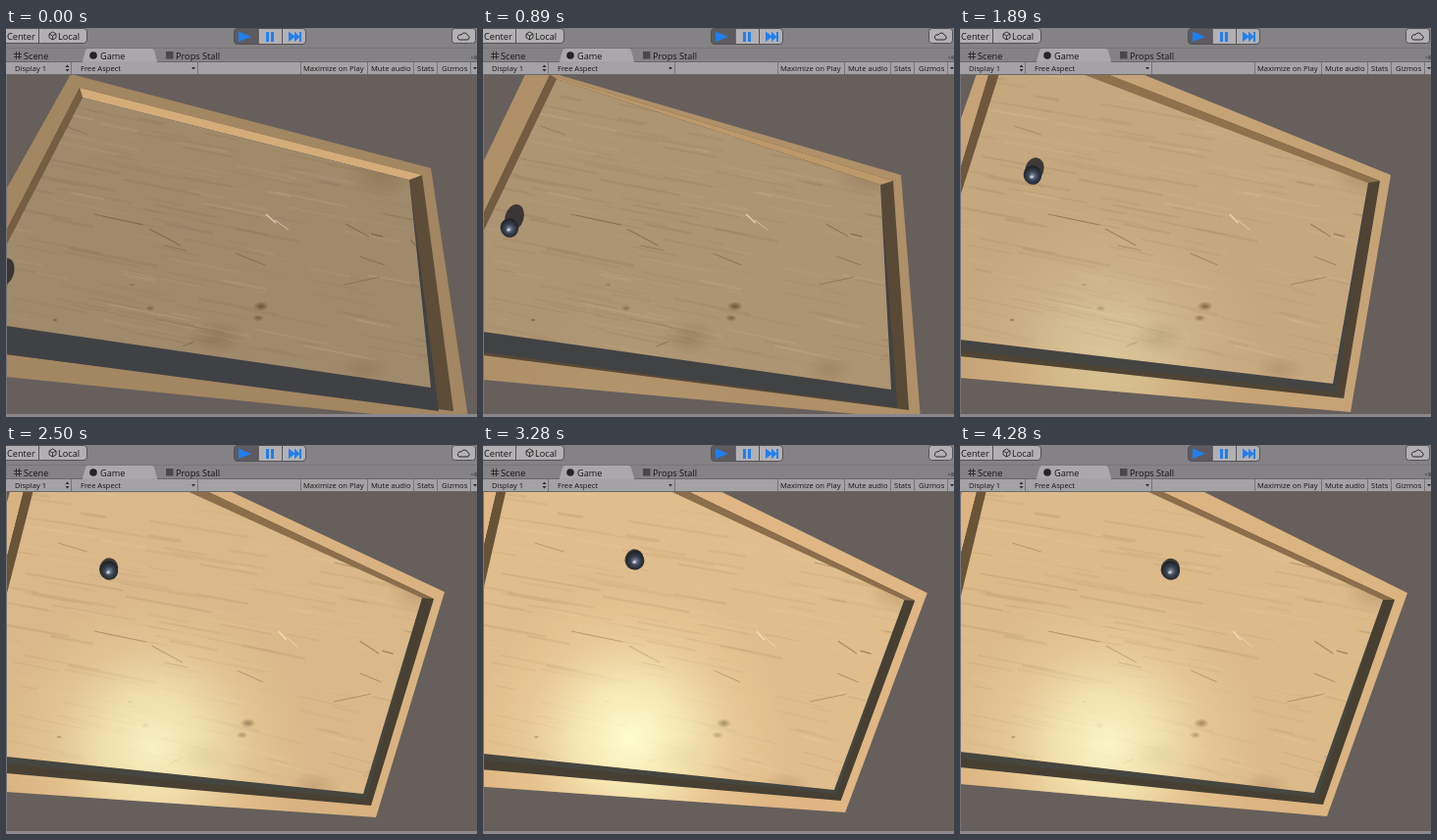
Write an HTML page with a canvas that moves like this. It is 480 px wide and 397 px high and loops after 4340 ms.

```html
<!DOCTYPE html>
<html lang="en">
<head>
<meta charset="utf-8">
<title>Ball on a tilting tray</title>
<style>
  html, body { margin: 0; width: 100%; height: 100%; overflow: hidden; background: #665f5b; }
  canvas, svg { position: absolute; left: 0; top: 0; }
  text { font: 9.2px "Open Sans", "Noto Sans", sans-serif; fill: #141414; }
  .small { font-size: 7.6px; }
</style>
</head>
<body>
<canvas id="view" width="480" height="397"></canvas>
<svg width="480" height="397">
  <rect width="480" height="47" fill="#858286"/>
  <path d="M0 20.5H480" stroke="#787579"/>
  <path d="M78 34L81 23Q82 21 84 21H148Q150 21 151 23L154 34Z" fill="#aba8ab"/>
  <rect y="34" width="480" height="13" fill="#a5a2a5"/>
  <path d="M0 34.5H78M154 34.5H480M0 47.5H480" stroke="#6b686b"/>
  <path d="M.5 47V397" stroke="#777377"/>
  <rect y="394" width="480" height="3" fill="#8b878a"/>

  <g fill="#b3b0b3" stroke="#555256">
    <path d="M-1 .5H33.5V15.5H-1ZM33.500 .5H79Q82.500 .5 82.500 4V12Q82.500 15.500 79 15.500H33.500Z"/>
    <path d="M257 .5H302Q305.500 .5 305.500 4V13Q305.500 16.500 302 16.500H257ZM281.500 .5V16.500"/>
    <path d="M257 .5H236Q232.500 .5 232.500 4V13Q232.500 16.500 236 16.500H257Z" fill="#5d5b61"/>
    <rect x="454.500" y=".5" width="24" height="15" rx="3"/>
  </g>
  <path d="M237 3.500L250 9L237 14ZM265 4H268V14H265ZM270 4H273V14H270ZM288 3.500L294 8V3.500L299 8.500V4H301V14H299V9.500L294 14V9.500L288 14Z" fill="#1f7ff0"/>
  <g fill="none" stroke="#2b2b2b">
    <path d="M462 12H470A2.300 2.300 0 0 0 470.500 7.500A3.500 3.500 0 0 0 464 7A2.500 2.500 0 0 0 462 12Z"/>
    <path d="M44 6L47.500 4L51 6V10L47.500 12L44 10ZM44 6L47.500 8L51 6M47.500 8V12" stroke-width=".9"/>
    <path d="M10.500 24V32M13.500 24V32M8 26.500H16M8 29.500H16" stroke-width=".9"/>
    <path d="M66.500 35V47M195.500 35V47M300.500 35V47M368.500 35V47M415.500 35V47M439.500 35V47M473.500 35V47" stroke="#777477"/>
    <path d="M474 30H476M477 29H480M477 31H480" stroke-width=".8"/>
  </g>
  <circle cx="89" cy="28" r="3.800" fill="#242424"/>
  <rect x="163" y="24" width="7.500" height="7.500" fill="#4a484b"/>
  <path d="M60.500 40L62.500 37.500L64.500 40ZM60.500 42L62.500 44.500L64.500 42ZM189 40H193L191 42.500ZM476 40H480L478 42.500Z" fill="#2b2b2b"/>

  <text x="1" y="12">Center</text>
  <text x="53" y="12">Local</text>
  <text x="18" y="32">Scene</text>
  <text x="96" y="32">Game</text>
  <text x="173" y="32">Props Stall</text>
  <g class="small">
    <text class="small" x="9" y="44">Display 1</text>
    <text class="small" x="76" y="44">Free Aspect</text>
    <text class="small" x="303" y="44">Maximize on Play</text>
    <text class="small" x="372" y="44">Mute audio</text>
    <text class="small" x="419" y="44">Stats</text>
    <text class="small" x="444" y="44">Gizmos</text>
  </g>
</svg>
<script>
const ctx = document.getElementById('view').getContext('2d');
const LOOP = 4340, FPS = 18;
const times = [0, 890, 1890, 2500, 2890, 3670, 4280];

// Each row: top left x y, top right x y, bottom right x y,
// then the heights where the lower and left edges cross x = 0.
const outerKeys = [
  [66, 47, 433, 143, 472, 404, 356, 165],
  [47, 39, 426, 150, 446, 400, 359, 137],
  [38, -13, 439, 150, 398, 392, 357, 95],
  [30, -46, 447, 150, 377, 380, 354, 62],
  [28, -55, 450, 151, 371, 376, 351, 50],
  [28, -60, 455, 151, 369, 375, 347, 50],
  [30, -61, 456, 151, 374, 379, 346, 55]
];
const innerKeys = [
  [75, 61, 424, 150, 456, 391, 333, 207],
  [68, 48, 418, 156, 434, 390, 334, 190],
  [42, 5, 428, 156, 391, 378, 335, 145],
  [38, -32, 436, 157, 372, 368, 335, 118],
  [34, -37, 438, 158, 366, 364, 333, 108],
  [34, -36, 442, 159, 365, 363, 330, 108],
  [37, -31, 443, 158, 370, 367, 329, 115]
];
const floorKeys = [
  [78, 71, 411, 155, 433, 367, 304, 222],
  [75, 52, 405, 160, 416, 369, 310, 208],
  [49, 18, 416, 158, 380, 363, 318, 172],
  [44, -17, 424, 156, 364, 356, 318, 155],
  [40, -23, 427, 157, 359, 353, 316, 150],
  [40, -23, 431, 159, 358, 352, 314, 150],
  [43, -21, 431, 158, 361, 355, 313, 158]
];
// Ball x, y and brightness of the light.
const ballKeys = [
  [-8, 262, 0], [27, 204, .2], [74, 150, .6], [105, 128, .92],
  [131, 120, 1], [179, 118, 1], [215, 128, .95]
];
// Scratches: x, y, dx, dy, width.
const scratches = [
  [90, 190, 50, 11, 1], [146, 205, 32, 17, 1.2], [160, 222, 24, 5, .8],
  [234, 230, 30, 12, 1], [346, 200, 24, 13, 1.1], [360, 233, 26, 9, .9],
  [345, 262, 36, -8, .8], [412, 216, 8, 9, 1.2], [372, 210, 12, 3, 1.4],
  [60, 100, 24, 9, .7], [296, 120, 20, 5, .8], [180, 325, 12, -5, 1]
];
// Spots: x, y, radius, opacity.
const spots = [
  [260, 284, 8, .75], [257, 296, 6, .6], [147, 286, 5, .5], [50, 298, 3, .7],
  [128, 262, 3, .4], [215, 316, 30, .22], [385, 150, 38, .2], [365, 348, 26, .15]
];

let seed = 11;
const random = () => (seed = seed * 16807 % 2147483647) / 2147483647;
const grain = Array.from({length: 280}, () => ({
  x: random() * 480 - 40, y: random() * 370 + 10, length: 15 + random() * 75,
  width: .6 + random() * 2.4, dark: random() < .6, alpha: .03 + random() * .07
}));

// Smooth curve through the keys, with unequal time steps.
function sample(keys, t) {
  const last = times.length - 1;
  let i = 0;
  while (i < last - 1 && t >= times[i + 1]) i++;
  const span = times[i + 1] - times[i], u = (t - times[i]) / span;
  return keys[i].map((_, c) => {
    const slope = k => {
      const a = Math.max(k - 1, 0), b = Math.min(k + 1, last);
      return (keys[b][c] - keys[a][c]) / (times[b] - times[a]) * span;
    };
    const p = keys[i][c], q = keys[i + 1][c], m = slope(i), n = slope(i + 1);
    return p + u * (m + u * (3 * (q - p) - 2 * m - n + u * (2 * (p - q) + m + n)));
  });
}

const lerp = (a, b, k) => a + (b - a) * k;
const mix = (a, b, k) => `rgb(${a.map((v, i) => Math.round(lerp(v, b[i], k)))})`;

function polygon(...coords) {
  const path = new Path2D();
  for (let i = 0; i < coords.length; i += 2) path.lineTo(coords[i], coords[i + 1]);
  path.closePath();
  return path;
}
const board = q => polygon(...q.slice(0, 6), 0, q[6], 0, q[7]);

function fill(path, style) {
  ctx.fillStyle = style;
  ctx.fill(path);
}

function radial(x, y, r, ...stops) {
  const g = ctx.createRadialGradient(x, y, 0, x, y, r);
  stops.forEach((s, i) => g.addColorStop(i / (stops.length - 1), s));
  return g;
}

function disc(x, y, rx, ry, angle, style) {
  ctx.beginPath();
  ctx.ellipse(x, y, rx, ry, angle, 0, 7);
  ctx.fillStyle = style;
  ctx.fill();
}

function drawWood(cornerX) {
  const shear = (cornerX - 433) * .004;
  const place = (x, y) => [x + shear * (y - 235) * (x - 90) / 170, y];
  const line = (x, y, dx, dy, width, color) => {
    ctx.beginPath();
    ctx.moveTo(...place(x, y));
    ctx.lineTo(...place(x + dx, y + dy));
    ctx.lineWidth = width;
    ctx.strokeStyle = color;
    ctx.stroke();
  };
  for (const g of grain)
    line(g.x, g.y, g.length, g.length * .2, g.width,
      `rgba(${g.dark ? '85,55,25' : '255,235,200'},${g.alpha})`);
  for (const [x, y, r, alpha] of spots) {
    const [px, py] = place(x, y);
    ctx.save();
    ctx.translate(px, py);
    ctx.scale(1, .6);
    disc(0, 0, r, r, 0, radial(0, 0, r, `rgba(92,60,32,${alpha})`, 'rgba(92,60,32,0)'));
    ctx.restore();
  }
  for (const [x, y, dx, dy, width] of scratches) line(x, y, dx, dy, width, 'rgba(95,65,38,.42)');
  line(265, 190, 10, 9, 1.6, 'rgba(255,240,215,.6)');
  line(274, 196, 14, 10, 1, 'rgba(255,240,215,.5)');
}

function drawBall(x, y, light) {
  const dark = 1 - light;
  disc(x + dark * 7.5 - 1, y - dark * 12 - 1, 9.5, 10.5 + dark * 4, .3, 'rgba(38,38,42,.85)');
  disc(x, y, 9.2, 9.8, -.3, radial(x, y + 1, 10, '#9aa3ae', '#5b687b', '#38414f', '#2b313b', '#1d2128'));
  disc(x - 1, y + 2, 1.8, 1.5, 0, 'rgba(225,230,235,.75)');
}

function draw(t) {
  const outer = sample(outerKeys, t), inner = sample(innerKeys, t), floor = sample(floorKeys, t);
  const [x, y, light] = sample(ballKeys, t);
  const glowPower = light * light * .95;
  const glow = radial(150, 400 - 100 * light, 160,
    `rgba(255,255,208,${glowPower})`, `rgba(255,250,198,${glowPower * .72})`,
    `rgba(255,235,180,${glowPower * .25})`, 'rgba(255,230,170,0)');

  fill(polygon(0, 0, 480, 0, 480, 397, 0, 397), '#665f5b');

  const rim = board(outer);
  fill(rim, mix([163, 134, 98], [222, 182, 132], light));
  fill(rim, glow);

  // Lower and right walls, then the shaded part of the floor.
  fill(board(inner), mix([92, 76, 56], [70, 63, 50], light));
  const depth = 1 - .6 * light;
  fill(polygon(...floor.slice(0, 4),
    lerp(floor[4], inner[4], .35), lerp(floor[5], inner[5], depth),
    0, lerp(floor[6], inner[6], depth), 0, floor[7]), mix([64, 65, 68], [70, 70, 64], light));

  fill(polygon(...inner.slice(0, 4), floor[2], floor[3], floor[0], floor[1]),
    mix([212, 172, 122], [140, 110, 76], Math.min(1, light * 1.6)));
  fill(polygon(inner[0], inner[1], floor[0], floor[1], 0, floor[7], 0, inner[7]),
    mix([118, 94, 66], [104, 83, 55], light));

  const base = board(floor);
  fill(base, mix([160, 138, 108], [223, 188, 140], light));
  ctx.save();
  ctx.clip(base);
  drawWood(floor[4]);
  fill(base, glow);
  ctx.restore();

  drawBall(x, y, light);
}

const start = performance.now();
function tick() {
  const t = (performance.now() - start) % LOOP;
  draw(Math.floor((t + 5) * FPS / 1000) * 1000 / FPS);
  requestAnimationFrame(tick);
}
tick();
</script>
</body>
</html>
```
